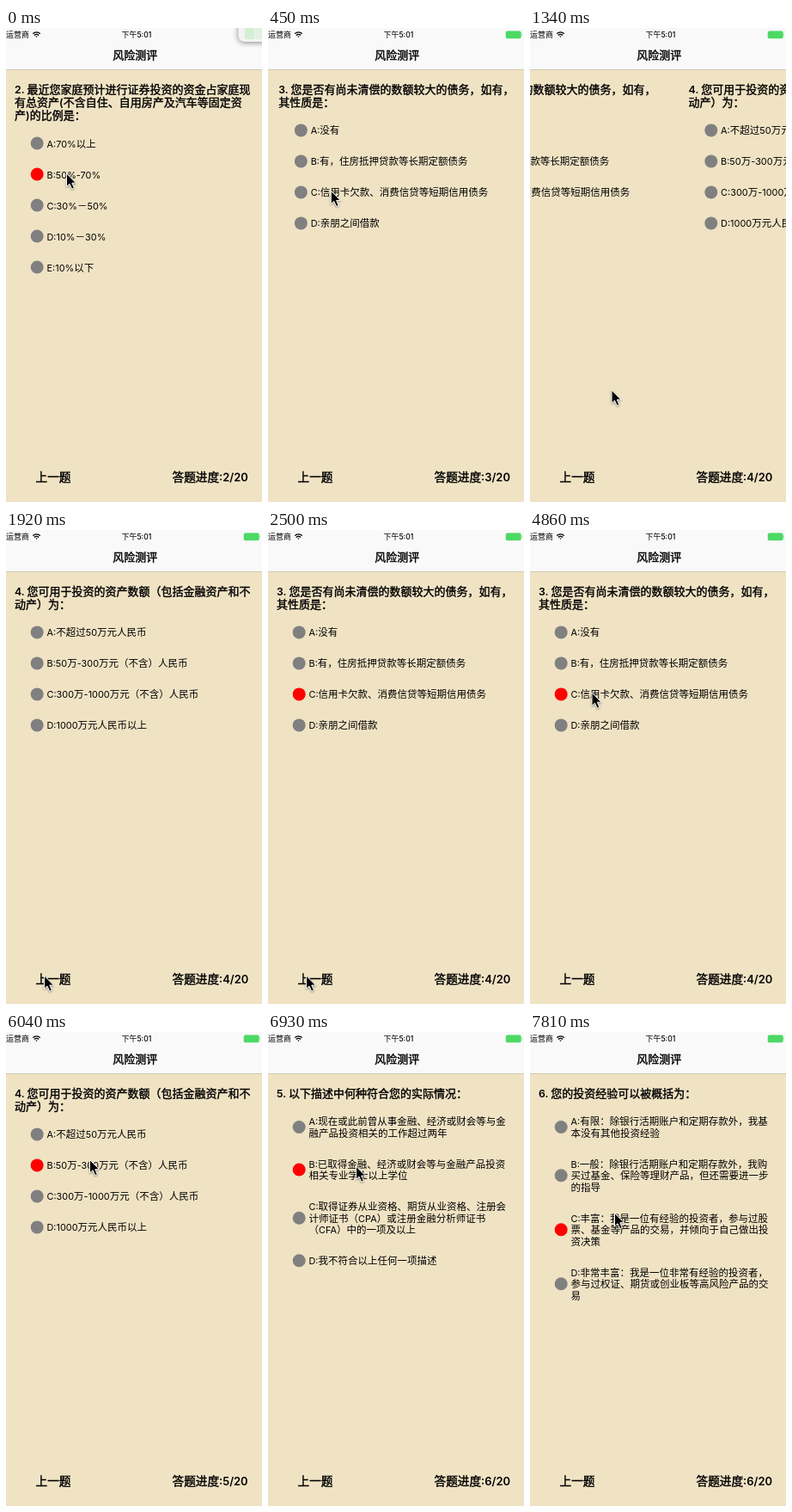
Animation of 298 by 551 pixels, one loop 8000 ms. Source, as an HTML page:

```html
<!DOCTYPE html>
<html lang="zh-CN">
<head>
<meta charset="utf-8">
<style>
html, body { margin: 0; width: 100%; height: 100%; overflow: hidden; background: #f0e3c4 }
svg { display: block; font: 11.5px Inter, "Noto Sans CJK SC", "Noto Sans CJK", sans-serif }
.b { stroke: #000; stroke-width: .4px }
.b tspan { font-weight: 600; stroke: none }
.q { font-size: 13px }
.bar { font-size: 13.65px }
.s { font-size: 9px }
tspan { font-size: .95em }
</style>
</head>
<body>
<svg width="298" height="551" viewBox="0 0 298 551">
  <rect width="298" height="551" fill="#f0e3c4"/>
  <g id="pages"></g>
  <rect width="298" height="48" fill="#f9f9f9"/>
  <rect y="48" width="298" height="1" fill="#d0c7b2"/>
  <text class="s" x="0" y="11.3">运营商</text>
  <g fill="none" stroke="#000" stroke-width="1.3">
    <path d="M31.2 6.6a6 6 0 0 1 8.6 0M32.8 8.5a3.8 3.8 0 0 1 5.4 0"/>
    <path d="M34.3 9.6h2.4l-1.2 1.5z" fill="#000" stroke="none"/>
  </g>
  <text class="s" x="151.8" y="11.3" text-anchor="middle" font-weight="500">下午<tspan>5:01</tspan></text>
  <g fill="#4cd964">
    <rect x="277" y="3.7" width="17.4" height="8.3" rx="1.5" stroke="#4cd964" stroke-opacity=".5"/>
    <path d="M295.3 6.3q1.6 1.5 0 3z"/>
  </g>
  <g id="popup">
    <rect x="270.5" y="-12" width="50" height="28" rx="7" fill="#f3f3f3" style="filter:drop-shadow(0 1px 3px #0007)"/>
    <rect x="278" width="11" height="13" fill="#d3eed3"/>
    <rect x="290" width="8" height="13" fill="#e2f0e2"/>
  </g>
  <text class="b q" x="150.3" y="36.2" text-anchor="middle">风险测评</text>
  <text class="b bar" x="34.5" y="527">上一题</text>
  <text class="b bar" x="193.5" y="527">答题进度<tspan id="count"></tspan></text>
  <path id="cursor" d="M0 0V15.4L3.5 12.2 6.2 18.2 8.9 17 6.3 11.2H11Z" stroke="#fff" style="filter:drop-shadow(0 1px 1px #0006)"/>
</svg>
<script>
const PITCH = 312.5, FIRST = 2, LOOP = 8000;
const TICK = 147.3, LAST = 53, DELAY = 1.06, SLIDE = 2.04, MOVE = 3;
const $ = id => document.getElementById(id);

// question | option | option ...; "/" breaks a line
const quiz = [
  '2. 最近您家庭预计进行证券投资的资金占家庭现/有总资产(不含自住、自用房产及汽车等固定资/产)的比例是：|A:70%以上|B:50%-70%|C:30%－50%|D:10%－30%|E:10%以下',
  '3. 您是否有尚未清偿的数额较大的债务，如有，/其性质是：|A:没有|B:有，住房抵押贷款等长期定额债务|C:信用卡欠款、消费信贷等短期信用债务|D:亲朋之间借款',
  '4. 您可用于投资的资产数额（包括金融资产和不/动产）为：|A:不超过50万元人民币|B:50万-300万元（不含）人民币|C:300万-1000万元（不含）人民币|D:1000万元人民币以上',
  '5. 以下描述中何种符合您的实际情况：|A:现在或此前曾从事金融、经济或财会等与金/融产品投资相关的工作超过两年|B:已取得金融、经济或财会等与金融产品投资/相关专业学士以上学位|C:取得证券从业资格、期货从业资格、注册会/计师证书（CPA）或注册金融分析师证书/（CFA）中的一项及以上|D:我不符合以上任何一项描述',
  '6. 您的投资经验可以被概括为：|A:有限：除银行活期账户和定期存款外，我基/本没有其他投资经验|B:一般：除银行活期账户和定期存款外，我购/买过基金、保险等理财产品，但还需要进一步/的指导|C:丰富：我是一位有经验的投资者，参与过股/票、基金等产品的交易，并倾向于自己做出投/资决策|D:非常丰富：我是一位非常有经验的投资者，/参与过权证、期货或创业板等高风险产品的交/易'
];

const tap = (at, key, x, y) => ({ at, key, x, y });
const taps = [
  tap(0, 'B', 70.5, 169), tap(7, 'C', 73, 190),
  tap(13.9, 'back', 44.5, 518), tap(19.3, 'back', 44.5, 518),
  tap(27, 'C', 67.5, 205), tap(34.5, 'C', 72, 189),
  tap(40.5, 'B', 97.5, 148.5), tap(46.5, 'B', 102.5, 156),
  tap(53, 'C', 98.5, 210.5)
];

const text = (s, x, y, cls = '') =>
  `<text class="${cls}" x="${x}" y="${y}">${s.replace(/[ -~]+/g, '<tspan>$&</tspan>')}</text>`;

function page(src, i) {
  const [title, ...options] = src.split('|').map(s => s.split('/'));
  let out = title.map((s, n) => text(s, 10, 75.9 + 15.1 * n, 'b q')).join('');
  let top = 70.7 + 15.1 * title.length;
  for (const lines of options) {
    const h = 22.5 + 13.5 * lines.length, mid = top + h / 2;
    out += `<circle cx="36.2" cy="${mid}" r="7.5"/>`;
    lines.forEach((s, n) => out += text(s, 47.5, mid + 4.5 + 13.5 * (n - (lines.length - 1) / 2)));
    top += h;
  }
  return `<g transform="translate(${i * PITCH})">${out}</g>`;
}
$('pages').innerHTML = quiz.map(page).join('');
const dots = [...$('pages').children].map(g => [...g.querySelectorAll('circle')]);

const clamp = v => Math.max(0, Math.min(1, v));
const ease = v => v * v * (3 - 2 * v);
const easeOut = v => 1 - (1 - v) ** 3;

// Replays the taps up to tick k.
function state(k) {
  const chosen = {};
  let current = FIRST, pos = FIRST, count = FIRST;
  for (const { at, key } of taps) {
    if (k < at) break;
    const back = key === 'back', old = chosen[current];
    const next = current + (back ? -1 : 1);
    if (!back) {
      chosen[current] = key;
      if (k >= at + .5) count = Math.max(count, next);
    }
    // a changed answer turns the page at once
    const changed = !back && old && old !== key;
    const u = clamp((k - at - DELAY) / (changed ? .01 : SLIDE));
    pos = current + (next - current) * ease(u);
    current = next;
  }
  return { chosen, pos, count };
}

// The pointer leaves after each tap and swings to the next in a bow.
function pointer(k) {
  const i = taps.filter(t => t.at <= k).length - 1;
  const a = taps[i], b = taps[i + 1] || a;
  const u = easeOut(clamp((k - a.at - 1) / MOVE)), dy = b.y - a.y;
  return [a.x + (b.x - a.x) * u + .16 * Math.abs(dy) * Math.sin(Math.PI * u), a.y + dy * u];
}

function draw(time) {
  const k = Math.min(LAST, Math.floor((time % LOOP + 6) / TICK));
  const { chosen, pos, count } = state(k);
  $('pages').setAttribute('transform', `translate(${(FIRST - pos) * PITCH})`);
  $('cursor').setAttribute('transform', `translate(${pointer(k)})`);
  $('count').textContent = `:${count}/20`;
  $('popup').style.display = k < 1 ? '' : 'none';
  dots.forEach((row, i) => row.forEach((dot, n) =>
    dot.setAttribute('fill', chosen[i + FIRST] === 'ABCDE'[n] ? '#f00' : '#808080')));
}

let begin;
function loop(now) {
  begin ??= now;
  draw(now - begin);
  requestAnimationFrame(loop);
}
draw(0);
requestAnimationFrame(loop);
</script>
</body>
</html>
```
